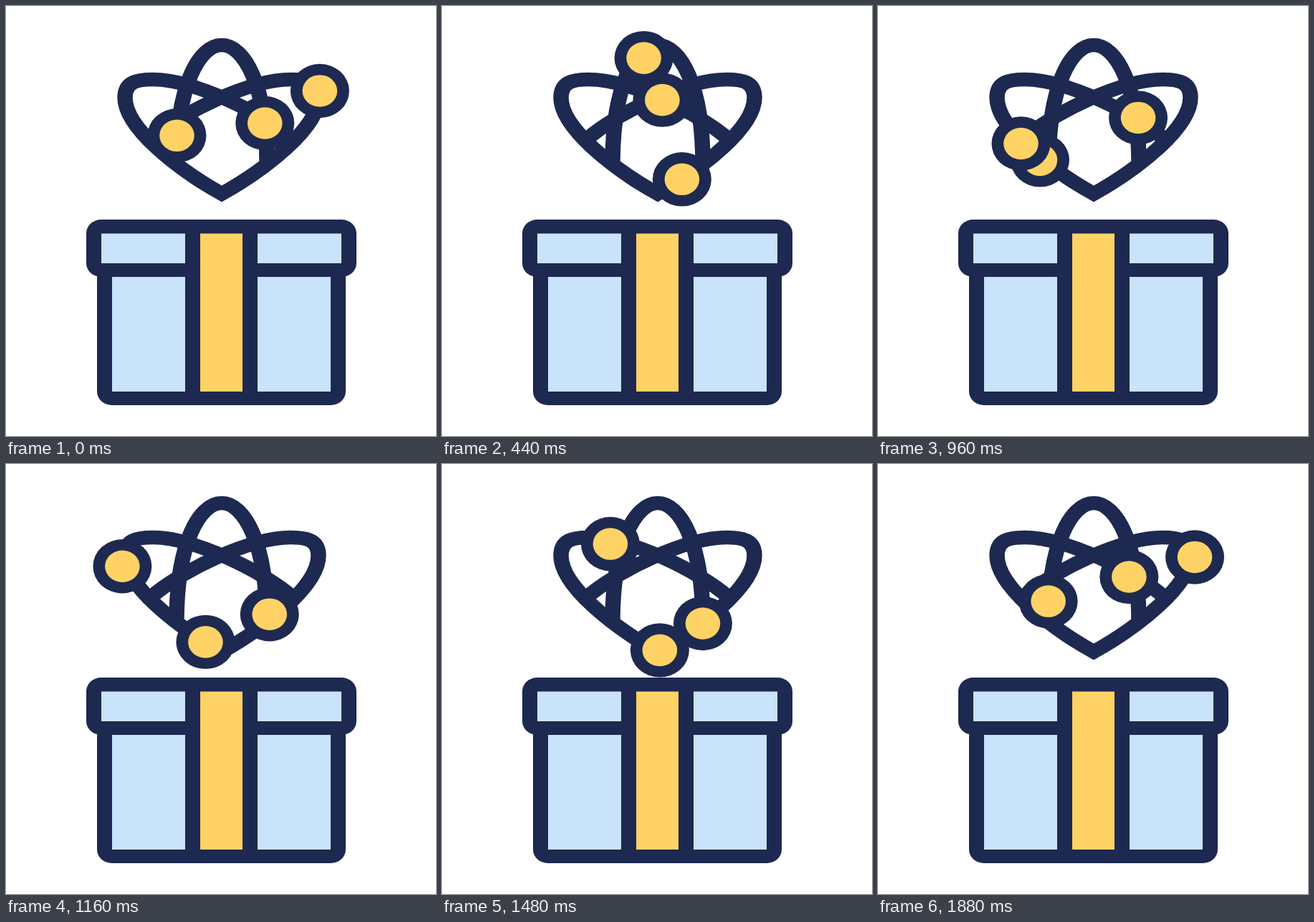
Animation, 600 px wide and 600 px high, one loop 1.92 s. Source, as an HTML page:

```html
<!DOCTYPE html>
<html lang="en">
<head>
<meta charset="utf-8">
<title>Gift with orbiting beads</title>
<style>
  html, body { margin: 0; width: 100%; height: 100%; overflow: hidden; background: #fff; }
  svg { display: block; width: 100%; height: 100%; }
  .navy { fill: #1d2951; }
  .blue { fill: #c9e3fb; }
  .gold { fill: #ffd265; }
  .line { fill: none; stroke: #1d2951; stroke-width: 19.5; stroke-miterlimit: 8; }
</style>
</head>
<body>
<svg viewBox="0 0 600 600">
  <!-- Drawn around the middle axis, slightly widened -->
  <g class="line" transform="translate(301 0) scale(1.1 1)">
    <path d="M-57.3 222C-57.3 110 -28.2 54.5 0 54.5S57.3 110 57.3 222"/>
    <path d="M90 186C53.6 150 -35.5 102.5 -87.3 102.5C-108.2 102.5 -122.7 106 -122.7 128C-122.7 170 -55.5 228 0 262C55.5 228 122.7 170 122.7 128C122.7 106 108.2 102.5 87.3 102.5C35.5 102.5 -53.6 150 -90 186"/>
  </g>
  <g class="navy">
    <rect x="112" y="298" width="377" height="80" rx="21" ry="19"/>
    <rect x="127" y="340" width="347" height="217" rx="21" ry="19"/>
  </g>
  <g class="blue">
    <rect x="133" y="317.5" width="117" height="41.5"/>
    <rect x="351" y="317.5" width="117" height="41.5"/>
    <rect x="148" y="378" width="102" height="160"/>
    <rect x="351" y="378" width="102" height="160"/>
  </g>
  <rect class="gold" x="271" y="317.5" width="59" height="220.5"/>
  <g id="beads"></g>
</svg>
<script>
const LOOP = 1920, STEP = 40, AXIS = 301;

// Both tracks start at the bottom tip and run clockwise
const ARCH = "M302 261L238 223C232 155 262 64 303 64S373 155 367 223Z";
const LOBE = "M301 261C243 230 164 176 160 132C159 116 174 107 200 107" +
  "C250 107 340 146 404 190C387 211 340 240 301 261Z";

function add(parent, tag, attrs = {}) {
  const el = document.createElementNS("http://www.w3.org/2000/svg", tag);
  for (const key in attrs) el.setAttribute(key, attrs[key]);
  return parent.appendChild(el);
}

// tipTime: when the bead passes the bottom tip
function makeBead(d, tipTime, mirrored = false) {
  const el = add(document.getElementById("beads"), "g");
  add(el, "ellipse", { rx: 41, ry: 37.7, class: "navy" });
  add(el, "ellipse", { rx: 24.3, ry: 22.3, class: "gold" });
  const track = document.createElementNS("http://www.w3.org/2000/svg", "path");
  track.setAttribute("d", d);
  const length = track.getTotalLength();

  return time => {
    const turn = (time - tipTime + LOOP) % LOOP / LOOP;
    const { x, y } = track.getPointAtLength(turn * length);
    el.setAttribute("transform", `translate(${mirrored ? 2 * AXIS - x : x} ${y})`);
  };
}

const beads = [
  makeBead(LOBE, 1243, true),
  makeBead(ARCH, 1488),
  makeBead(LOBE, 565)
];
const start = performance.now();

function draw() {
  const time = Math.floor((performance.now() - start) % LOOP / STEP) * STEP;
  beads.forEach(move => move(time));
  requestAnimationFrame(draw);
}
draw();
</script>
</body>
</html>
```
